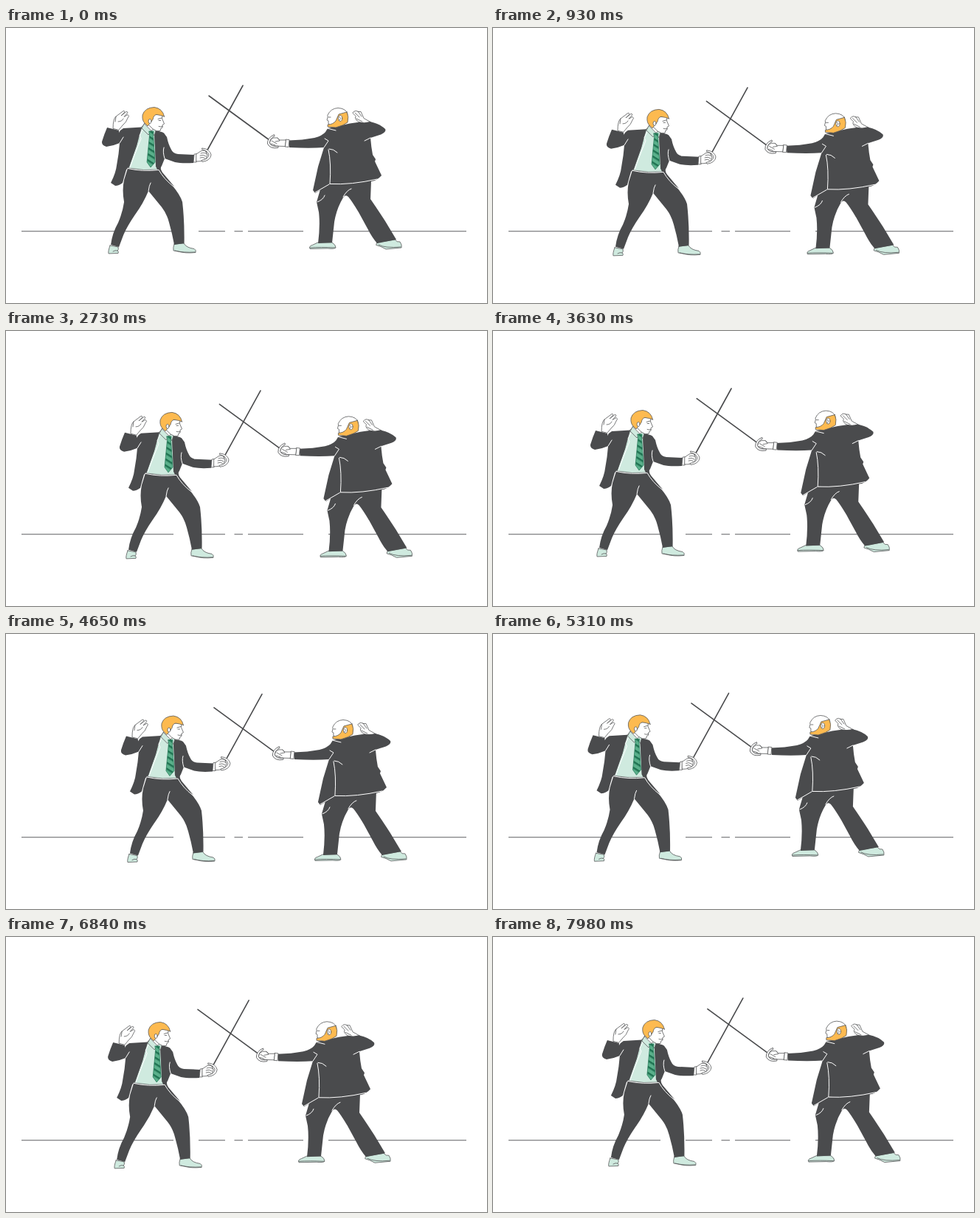
Recreate the animation shown at these times as an HTML page without scripts. Size 652 by 373 pixels, loop 8 s.

```html
<!DOCTYPE html>
<html lang="en">
<head>
<meta charset="utf-8">
<title>Fencing businessmen</title>
<style>
  html, body { margin: 0; width: 100%; height: 100%; overflow: hidden; background: #fff; }
  svg { display: block; width: 100vw; height: 100vh; }
  path, use, ellipse { stroke-linecap: round; stroke-linejoin: round; }
  .ground { fill: none; stroke: #808183; stroke-width: 1.1; stroke-linecap: butt; }
  .suit { fill: #4a4b4d; }
  .seam { fill: none; stroke: #fff; }
  .skin, .hair, .mint, .ink { stroke: #57585a; stroke-width: .8; }
  .skin { fill: #fff; }
  .hair { fill: #fdba50; }
  .mint { fill: #cfeadf; }
  .ink { fill: none; }
  .blade { fill: none; stroke: #4a4b4d; stroke-width: 1.6; }
  .tie { fill: url(#stripes); stroke: #1f7352; stroke-width: .7; }
</style>
</head>
<body>
<svg viewBox="0 0 652 373" preserveAspectRatio="none" xmlns="http://www.w3.org/2000/svg">
  <defs>
    <pattern id="stripes" width="10" height="7" patternUnits="userSpaceOnUse" patternTransform="rotate(32)">
      <rect width="10" height="7" fill="#5ab08b"/>
      <rect width="10" height="2.500" fill="#1f7352"/>
    </pattern>
    <path id="guard" d="M-2 -9Q8 -8 10 0Q9 8 -2 9.500L-3 7.500Q6 6 7 0Q5 -6 -2 -7Z"/>
  </defs>

  <path class="ground" d="M21 275.600H227M261 275.600H297M309.500 275.600H321M328 275.600H403M437 275.600H624"/>

  <!-- Left fencer: sway, then bounce -->
  <g>
    <animateTransform id="leftSway" attributeName="transform" type="translate" additive="sum"
      begin="0s;leftSway.end" dur="1.8s" repeatDur="8s" calcMode="spline"
      values="0 0;7 0;7.700 0;26 0;-1.500 0;0 0" keyTimes="0;.15;.25;.594;.944;1"
      keySplines=".2 .6 .5 1;0 0 1 1;.4 0 .6 1;.4 0 .6 1;.4 0 .8 .6"/>
    <animateTransform id="leftBounce" attributeName="transform" type="translate" additive="sum"
      begin="0s;leftBounce.end" dur="1.8s" repeatDur="8s" calcMode="spline"
      values="0 0;0 -4;0 9;0 2.500;0 11;0 0" keyTimes="0;.267;.383;.472;.85;1"
      keySplines=".8 0 .7 1;.5 0 .6 1;.4 0 .6 1;.6 .2 .95 .6;.3 0 .6 1"/>

    <path class="mint" d="M141 295L152 297Q153 301 151 302Q153 303 152 305.500L139 306Q138 303 141 295Z"/>
    <path class="mint" d="M228 293L241 292Q244 298 255 299.500Q258 301 257 304.500Q243 306 233 303L227 302Q226 298 228 293Z"/>
    <path class="ink" d="M145 303Q148 301 151 302M229 302Q240 305 256 304"/>
    <path class="suit" d="M165 190Q185 194 207 192Q214 203 224 212Q236 226 239 236Q242 262 241.500 292L228 294Q225 278 221 264Q218 252 211 243L193 221Q186 238 175 253Q164 269 159 281L153 297 142 294Q144 278 152 264Q158 250 160 236Q157 220 160 206Z"/>
    <path class="seam" d="M193 221Q194 213 196 210"/>

    <path class="mint" d="M184 134L188 130 201 139 204 187 207 192Q186 194 166 190L177 158Z"/>
    <path class="suit" d="M137 135L153 139 153 142Q155 138 159 136L184 134.500Q180 146 177 160L167 188 163 192Q160 202 158 210Q153 214 148 214L142 210Q149 196 150 186Q153 170 154 156Q145 160 136 161Q129 159 130 154Q133 144 137 135Z"/>
    <path class="suit" d="M201 139Q210 140 214 142.500L218 148Q220 158 224 165Q226 170 233 171L255 172 254 183Q238 184 229 182L215 177 211 187Q208 190 212 196L228 215Q210 205 203 188Z"/>
    <path class="seam" d="M154 156L159 148M186 136L181 146 183 150Q174 172 168 189M165 190.500Q185 195 207 192.500Q214 205 227 215M215 177Q212 168 214 162"/>

    <path class="skin" d="M189 126L187 132 197 144 201 139 203 133Z"/>
    <path class="mint" d="M187 130L184 136 193 145 197 140ZM197 140L201 146 203 139 201 136Z"/>
    <path class="tie" d="M194 140L200 140 199.500 145 202 182 196 189 191 182 194.500 145Z"/>

    <path class="skin" d="M193 118L212 117 211.500 123 214.500 130 212 131.500 212 135 210 136 209 139.500Q204 141 199 137L192 130Z"/>
    <path class="hair" d="M214.500 120Q212 109 201 107.500Q188 108 185 118Q184 126 189 130L192 133 196 128 199 124Q200 118 204 117.500Q209 118 214.500 120Z"/>
    <ellipse class="skin" cx="195" cy="126.500" rx="2" ry="3"/>
    <path class="ink" d="M206 123.500L211 122M207 125.500H209.500M207 133.500Q209 134.500 212 133.500"/>

    <path class="skin" d="M145 136Q145 123 149 120L159 112.500Q162 112.500 160 115L156 119 163 113.500Q166 113.500 164 116L160 120.500 165 117.500Q168 119 165 122Q163 128 158 132L153 138Z"/>
    <path class="ink" d="M149 120L148 127M152 127Q157 127 159 123"/>

    <path class="skin" d="M255 171.500L254 182 258 182 259 171Z"/>
    <path class="blade" d="M271 169L321 78"/>
    <path class="skin" d="M258 171L264 167Q269 165 271 168L273 172 271 178Q267 181 258 181Z"/>
    <path class="ink" d="M264 170Q269 168 272 171M263 173Q267 171 271 174M263 176Q267 174 270 177"/>
    <use href="#guard" class="skin" x="268" y="172"/>
  </g>

  <!-- Right fencer: sway, then bounce -->
  <g>
    <animateTransform id="rightSway" attributeName="transform" type="translate" additive="sum"
      begin="0s;rightSway.end" dur="1.8s" repeatDur="8s" calcMode="spline"
      values="0 0;3.200 0;3.300 0;16.500 0;-15 0;0 0" keyTimes="0;.11;.22;.472;.8;1"
      keySplines=".2 .6 .5 1;0 0 1 1;.4 0 .6 1;.35 .05 .6 1;.5 0 .8 .7"/>
    <animateTransform id="rightBounce" attributeName="transform" type="translate" additive="sum"
      begin="0s;rightBounce.end" dur="1.8s" repeatDur="8s" calcMode="spline"
      values="0 0;0 -1;0 8;0 0" keyTimes="0;.11;.61;1"
      keySplines=".2 .6 .5 1;.4 0 .6 1;.5 0 .8 .6"/>

    <path class="mint" d="M423 291L442 291Q447 294 447 298Q445 300 436 299L412 299.500Q410 296 415 294.500Z"/>
    <path class="mint" d="M503 291L527 287Q530 291 534 290Q537 294 536 298L515 300Q508 296 502 294.500Z"/>
    <path class="ink" d="M412 298Q426 297 446 298M505 294Q514 299 535 297"/>
    <path class="suit" d="M428 212L495 206 494 232Q503 245 514 262L529 287 503 292Q496 284 490 272L478 250Q469 235 464 229Q460 225 457 230Q448 245 445 263L442 291 423 292Q426 268 424 250L421 236Z"/>
    <path class="seam" d="M422 236Q430 233 432 227M457 229Q462 220 468 218"/>

    <path class="skin" d="M470 115L472 113Q475 111.500 477 113.500L481 113.500 485 122.500 495 128 484 131 476 126Q472 122 474 120Z"/>
    <path class="ink" d="M473 115L479 121M477 113L482 120M475 123L483 127"/>
    <path class="suit" d="M383 152.500Q402 152 418 149Q429 146 433 141L436 136Q451 133 466 129.500L480 127.500Q487 129 493 127Q507 130 514 137Q516 141 508 144.500L494 149Q495 162 497 172L501 178 500 181 509 200Q503 207 495 208Q468 212 440 211L419 224 416 220 423 188 431 162Q412 163.500 384 162Z"/>
    <path class="seam" d="M431 162L437 153 432 150M437 165Q441 184 439 211M438 164Q444 164 449 169M439 211.500Q468 213 503 205M494 149L486 153M435 136L447 139M419 223L438 212"/>

    <path class="skin" d="M436 118Q440 109 450 108.500Q461 109 463 117L458 130 441 133 437 130 437 126 435 125 436 121Z"/>
    <path class="hair" d="M462 114L451 117 447 126Q443 131 436 131L436 134 447 135Q458 132 463 128Q465 120 462 114Z"/>
    <ellipse class="skin" cx="453" cy="122.500" rx="2.600" ry="4"/>
    <path class="ink" d="M452 121Q455 122 452 125M437 121H440"/>

    <path class="skin" d="M384 152L383 161.500 378 161 379 151.500Z"/>
    <path class="blade" d="M357 152L275 92"/>
    <path class="skin" d="M379 152L371 152 368 149Q362 148 359 151L357 156 361 160 378 160.500Z"/>
    <path class="ink" d="M368 149L371 153 365 154M360 153L367 157M359 157L365 159"/>
    <use href="#guard" class="skin" transform="translate(364 154) scale(-1 1) rotate(18)"/>
  </g>
</svg>
</body>
</html>
```
